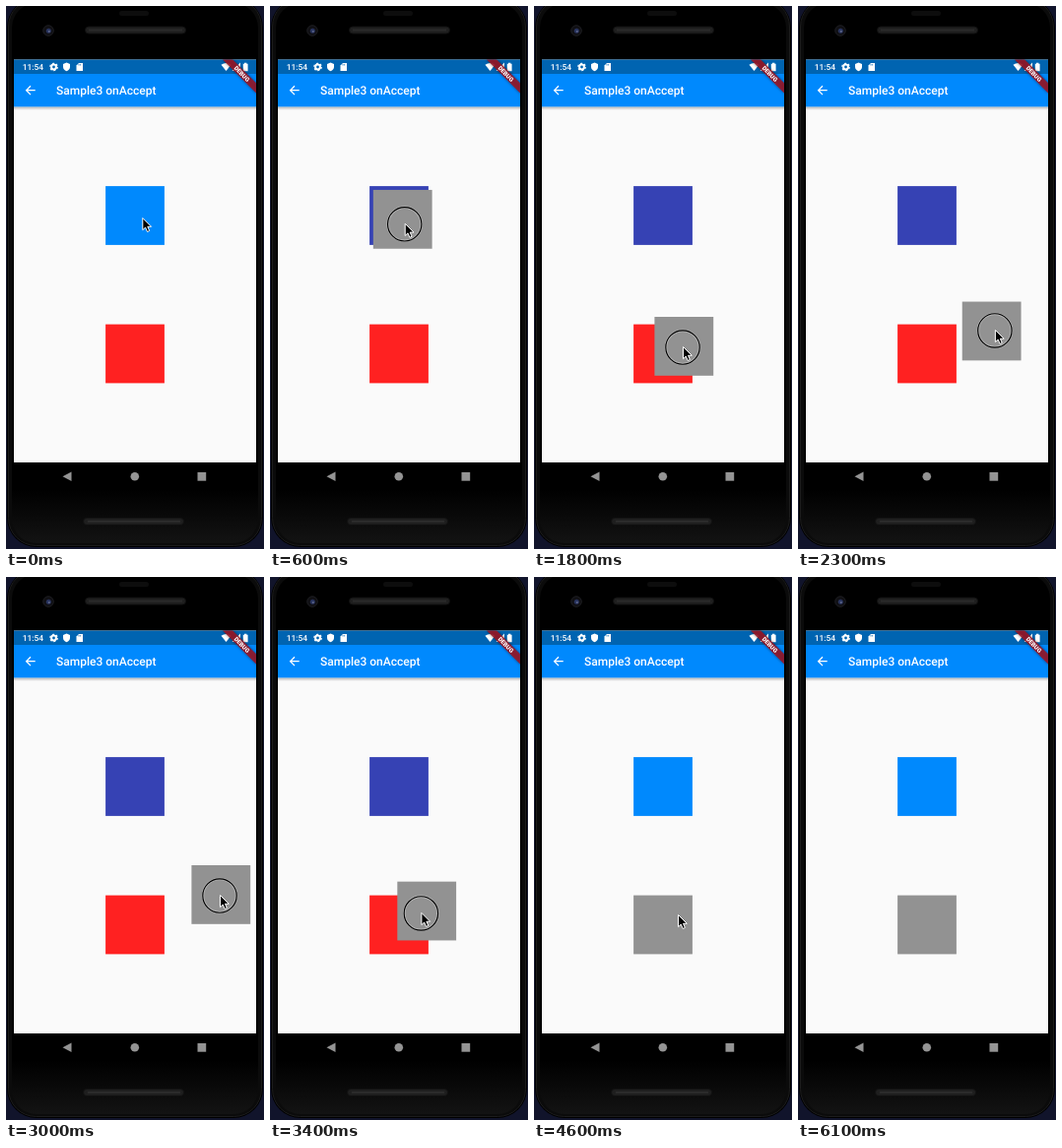
An HTML page that plays this animation: 262x552 px, repeating every 6200 ms.

```html
<!DOCTYPE html>
<html lang="en">
<head>
<meta charset="utf-8">
<title>Drag and drop</title>
<style>
html, body { margin: 0; width: 100%; height: 100%; overflow: hidden; background: #000; }
svg { display: block; width: 262px; height: 552px; }
text { font-family: Roboto, sans-serif; font-weight: 500; fill: #fff; text-rendering: geometricPrecision; }
</style>
</head>
<body>
<svg viewBox="0 0 262 552">
  <defs>
    <linearGradient id="shade" x2="0" y2="1">
      <stop offset="0" stop-color="#000" stop-opacity=".28"/>
      <stop offset="1" stop-color="#000" stop-opacity="0"/>
    </linearGradient>
    <linearGradient id="glow" x2="0" y2="1">
      <stop offset=".9" stop-color="#000"/>
      <stop offset="1" stop-color="#131313"/>
    </linearGradient>
    <clipPath id="screen"><rect x="8" y="54.5" width="246" height="436"/></clipPath>
    <filter id="blur" x="-30%" y="-100%" width="160%" height="300%"><feGaussianBlur stdDeviation="1.5"/></filter>
  </defs>

  <!-- phone body -->
  <rect width="262" height="552" fill="#11142b"/>
  <rect x="1" y="-8" width="260" height="558" rx="30" fill="#000"/>
  <rect x="2.5" y="-7" width="257" height="555.5" rx="28" fill="#0b0b0b" stroke="#1c1c1c"/>
  <rect x="6" y="-3" width="250" height="549" rx="25" fill="url(#glow)"/>
  <rect x="115" y="5" width="30" height="5" rx="2.5" fill="#0d0d0d"/>
  <g fill="#1f1f1f" stroke="#111">
    <rect x="80.500" y="21" width="102" height="7" rx="3.5"/>
    <rect x="78.500" y="520.500" width="102" height="7" rx="3.5"/>
  </g>
  <path d="M84 24.500H179M83 524H177" stroke="#2b2b2b" stroke-width="2"/>
  <circle cx="43" cy="25" r="5.300" fill="#101014" stroke="#1d1d20"/>
  <circle cx="43.300" cy="25.300" r="2.500" fill="#29345f"/>
  <circle cx="43.800" cy="25.800" r=".9" fill="#6d7699"/>

  <!-- screen -->
  <g clip-path="url(#screen)">
    <rect x="8" y="54" width="246" height="410" fill="#fafafa"/>
    <rect x="8" y="102.400" width="246" height="3.600" fill="url(#shade)"/>
    <rect x="8" y="69" width="246" height="33.400" fill="#0089fd"/>
    <rect x="8" y="54" width="246" height="15" fill="#0064b1"/>
    <text x="16.700" y="65.200" font-size="8.400">11:54</text>
    <g fill="#fff">
      <circle cx="48.500" cy="62" r="2.400" fill="none" stroke="#fff" stroke-width="2"/>
      <circle cx="48.500" cy="62" r="3.700" fill="none" stroke="#fff" stroke-width="1.300" stroke-dasharray="1.94"/>
      <path d="M61.500 57.500L65 59V62Q64.800 65 61.500 66.300Q58.200 65 58 62V59Z"/>
      <path d="M74 58H78V66H71.500V60.500Z"/>
      <path d="M218.500 59.800Q223.500 56 228.500 59.800L223.500 66Z"/>
      <path d="M229.500 66L238 57.500V66Z"/>
      <path d="M240.800 58.800H242V57.800H244.400V58.800H245.600V66.200H240.800Z"/>
    </g>
    <path d="M74 59V60.500M75.700 59V60.500" stroke="#0064b1" stroke-width=".7"/>
    <path d="M29.700 85.700H20.800M25 81.300L20.600 85.700L25 90.100" fill="none" stroke="#fff" stroke-width="1.250"/>
    <text x="51" y="89.900" font-size="12">Sample3 onAccept</text>

    <rect id="box" x="101.100" y="183.100" width="59.800" height="59.800"/>
    <rect id="target" x="101.100" y="323.600" width="59.800" height="59.800"/>
    <rect id="drag" width="59.800" height="59.800" fill="#929292"/>

    <g transform="translate(254 54.5) rotate(45)">
      <rect x="-24" y="16.800" width="48" height="7.200" fill="#000" opacity=".5" filter="url(#blur)"/>
      <rect x="-24" y="16.800" width="48" height="7.200" fill="#a01424" opacity=".85"/>
      <text y="22.600" font-size="6.100" text-anchor="middle" style="font-weight:900">DEBUG</text>
    </g>

    <rect x="8" y="464" width="246" height="27" fill="#000"/>
    <g fill="#949494">
      <path d="M57.500 478.300L66.500 473.600V483Z"/>
      <circle cx="130.800" cy="478.300" r="4.300"/>
      <rect x="194.500" y="474" width="8.700" height="8.700"/>
    </g>
  </g>

  <g id="touch" fill="none">
    <circle r="17" stroke="#fff" stroke-opacity=".3" stroke-width="2.600"/>
    <circle r="17.200" stroke="#000" stroke-width="1.150"/>
  </g>
  <path id="cursor" d="M0 0V12.200L2.800 9.600L4.700 14L6.900 13L5 8.800H8.800Z" fill="#000" stroke="#fff" stroke-linejoin="round"/>
</svg>
<script>
const LOOP = 6200, STEP = 100;
const PRESS = 400, LIFT = 500, DROP = 4000, GONE = 5600;
const LAG = 30, GRIP = { x: 28.6, y: 31 };
const BLUE = "#0089fd", INDIGO = "#3642b4", RED = "#ff2121", GRAY = "#929292";

// The pointer rests between moves; bow bends a move sideways.
const home = { x: 138.3, y: 216 };
const moves = [
  { from: 0, to: 300, x: 130, y: 214 },
  { from: 500, to: 1180, x: 151, y: 347, bow: 30 },
  { from: 1900, to: 2500, x: 217, y: 324 },
  { from: 3000, to: 3500, x: 146, y: 344 },
  { from: 5000, to: 5600, x: 170, y: 560 }
];

const el = id => document.getElementById(id);
const box = el("box"), target = el("target"), drag = el("drag");
const touch = el("touch"), cursor = el("cursor");
const clamp = v => Math.max(0, Math.min(1, v));
const ease = k => k * k * (3 - 2 * k);

function pointer(t) {
  let { x, y } = home;
  for (const m of moves) {
    const k = ease(clamp((t - m.from) / (m.to - m.from)));
    x += (m.x - x) * k + (m.bow || 0) * Math.sin(Math.PI * k);
    y += (m.y - y) * k;
  }
  return { x, y };
}

function place(node, x, y, shown) {
  node.setAttribute("transform", `translate(${x} ${y})`);
  node.setAttribute("visibility", shown ? "visible" : "hidden");
}

function draw(ms) {
  const t = Math.floor(ms % LOOP / STEP) * STEP;
  const p = pointer(t), late = pointer(t - LAG);
  const dragging = t >= LIFT && t < DROP;
  box.setAttribute("fill", dragging ? INDIGO : BLUE);
  target.setAttribute("fill", t < DROP ? RED : GRAY);
  place(drag, late.x - GRIP.x, late.y - GRIP.y, dragging);
  place(touch, p.x, p.y, t >= PRESS && t < DROP);
  place(cursor, p.x + 0.5, p.y - 0.5, t < GONE);
}

const start = performance.now();
function tick() {
  draw(performance.now() - start);
  requestAnimationFrame(tick);
}
tick();
</script>
</body>
</html>
```
